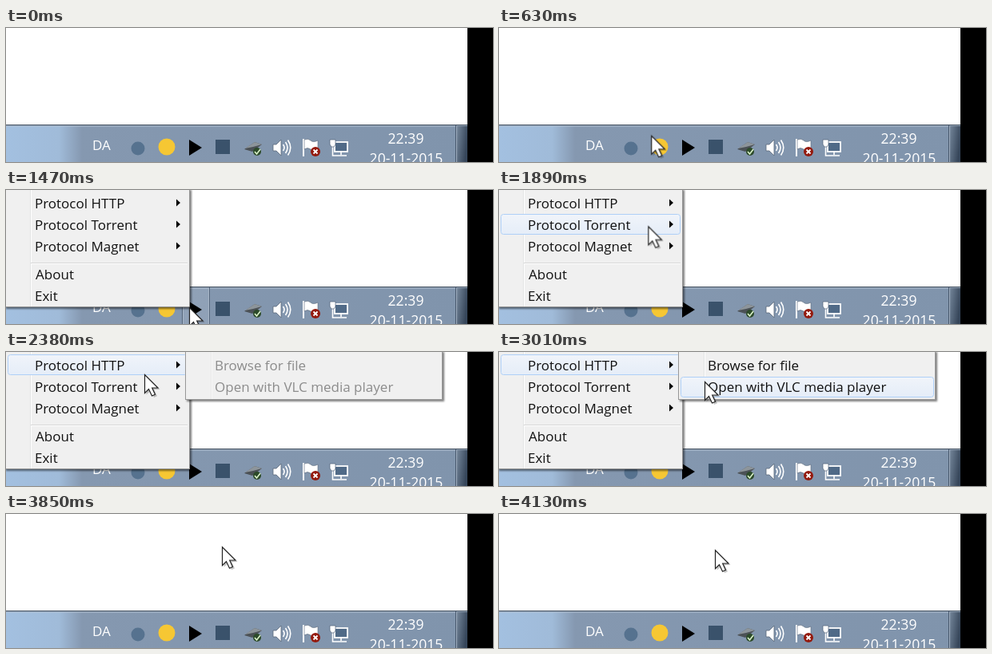
Write an HTML page that moves like this. It is 609x168 px and loops after 4270 ms.

```html
<!DOCTYPE html>
<html lang="en">
<head>
<meta charset="utf-8">
<title>Tray menu</title>
<style>
  html, body { margin: 0; width: 100%; height: 100%; overflow: hidden; background: #fff; }
  svg { display: block; font: 17px "Open Sans", "Noto Sans", sans-serif; }

  /* 61 ticks of 70 ms */
  .menu, .sub, .label, .hover, .pick, .subpick, .cursor { animation: 4270ms step-end infinite; }
  .menu { animation-name: menu; }
  .sub { animation-name: sub; }
  .label { animation-name: label; }
  .hover { animation-name: hover; }
  .pick { animation-name: pick; }
  .subpick { animation-name: subpick; }
  .cursor { animation-name: cursor; }

  .panel { fill: #f0f0f0; stroke: #979797; }
  .menu, .sub { filter: drop-shadow(2px 2px 1.2px rgba(0, 0, 0, .5)); }
  .menu text, .sub text { fill: #111; }
  .bar { fill: #fff; }
  .line { fill: none; stroke: #fff; stroke-width: 1.6; }

  @keyframes menu {
    0% { opacity: 0; }
    32.786% { opacity: .5; }
    34.426% { opacity: 1; }
    86.885% { opacity: .66; }
    88.524% { opacity: .3; }
    90.163%, 100% { opacity: 0; }
  }
  @keyframes sub {
    0% { opacity: 0; }
    55.737% { opacity: 1; }
    86.885% { opacity: .66; }
    88.524% { opacity: .3; }
    90.163%, 100% { opacity: 0; }
  }
  @keyframes label {
    0% { opacity: .45; }
    57.377%, 100% { opacity: 1; }
  }
  @keyframes hover {
    0% { opacity: 0; }
    19.672% { opacity: 1; }
    39.344%, 100% { opacity: 0; }
  }
  @keyframes pick {
    0% { opacity: 0; transform: translateY(116px); }
    37.704% { opacity: 1; transform: translateY(116px); }
    39.344% { opacity: 1; transform: translateY(89px); }
    40.983% { opacity: 1; transform: translateY(54px); }
    44.262% { opacity: 1; transform: translateY(27px); }
    45.901%, 100% { opacity: 1; transform: none; }
  }
  @keyframes subpick {
    0% { opacity: 0; transform: none; }
    63.934% { opacity: 1; transform: none; }
    67.213%, 100% { opacity: 1; transform: translateY(27px); }
  }
  @keyframes cursor {
    0% { transform: translate(-60px, 0); }
    8.196% { transform: translate(137px, 156px); animation-timing-function: steps(3, end); }
    13.114% { transform: translate(180px, 130px); animation-timing-function: steps(4, end); }
    19.672% { transform: translate(221px, 149px); animation-timing-function: steps(3, end); }
    24.590% { transform: translate(229px, 147px); }
    36.065% { transform: translate(229px, 147px); animation-timing-function: steps(3, end); }
    40.983% { transform: translate(213px, 80px); animation-timing-function: steps(3, end); }
    45.901% { transform: translate(173px, 28px); }
    55.737% { transform: translate(173px, 28px); animation-timing-function: steps(4, end); }
    62.295% { transform: translate(222px, 20px); animation-timing-function: steps(3, end); }
    67.213% { transform: translate(255px, 35px); }
    70.491% { transform: translate(257px, 37px); animation-timing-function: steps(6, end); }
    80.327% { transform: translate(270px, 38px); }
    85.245% { transform: translate(270px, 38px); animation-timing-function: steps(7, end); }
    96.721%, 100% { transform: translate(270px, 45px); }
  }
</style>
</head>
<body>
<svg width="609" height="168" viewBox="0 0 609 168">
  <defs>
    <linearGradient id="glass">
      <stop offset="0" stop-color="#a3c0e0"/>
      <stop offset=".115" stop-color="#a0bbd9"/>
      <stop offset=".165" stop-color="#8598b0"/>
      <stop offset="1" stop-color="#8094ac"/>
    </linearGradient>
    <linearGradient id="edge" x2="1" y2=".4">
      <stop offset="0" stop-color="#77899d"/>
      <stop offset="1" stop-color="#36465a"/>
    </linearGradient>
    <linearGradient id="glow" x2="0" y2="1">
      <stop offset="0" stop-color="#f0f4fa"/>
      <stop offset="1" stop-color="#e5edf8"/>
    </linearGradient>
    <path id="arrow" d="M0-4.5 5 0 0 4.5z"/>
  </defs>

  <rect width="609" height="168" fill="#fff"/>

  <g id="taskbar">
    <rect y="122" width="577" height="46" fill="url(#glass)"/>
    <rect y="121" width="577" height="1.5" fill="#4a5767"/>
    <rect y="122.5" width="577" height="1" fill="#b4c4d6"/>
    <rect x="563" y="123" width="14" height="45" fill="url(#edge)"/>
    <rect x="562" y="122" width="1" height="46" fill="#46566a"/>
    <rect x="563" y="123" width="1" height="45" fill="#a3b2c4"/>
    <g class="hover">
      <rect x="221" y="123" width="33" height="45" fill="#fff" opacity=".1"/>
      <path d="M220.5 122v46M254.5 122v46" stroke="#53647a"/>
      <path d="M221.5 123v45M253.5 123v45" stroke="#a9b7c8"/>
    </g>

    <g fill="#fff">
      <text x="108" y="153">DA</text>
      <g font-size="17.6" text-anchor="middle">
        <text x="500" y="145">22:39</text>
        <text x="500.5" y="170">20-11-2015</text>
      </g>
    </g>

    <circle cx="165" cy="151" r="8.5" fill="#56728f"/>
    <circle cx="201" cy="149" r="10.5" fill="#f6c733"/>
    <path d="M229 140v20l16-10z"/>
    <rect x="262" y="140" width="18" height="18" fill="#3a526b"/>

    <g id="device">
      <path d="M298 152l13-9 9 3-12 9z" fill="#4b5156"/>
      <path d="M299 151l12-8 9 3-11 3z" fill="#8d959b"/>
      <circle cx="314" cy="155" r="5" fill="#2c4a2a"/>
      <path d="M311 155l2.5 3 4.5-6" fill="none" stroke="#d9f2c8" stroke-width="1.6"/>
    </g>

    <g id="speaker">
      <path class="bar" d="M334 146h4l6-6v20l-6-6h-4z" stroke="#5a6879" stroke-width=".8"/>
      <path class="line" d="M346.5 146q3 4 0 8M349.5 143q5 7 0 14M352.5 140.5q6.5 9.500 0 19"/>
    </g>

    <g id="flag">
      <path d="M372 139v22" stroke="#fff" stroke-width="2"/>
      <path class="bar" d="M373 140q5-2 8 1t9 0v12q-5 2-9-1t-8 0z" stroke="#58677a" stroke-width=".6"/>
      <circle cx="387" cy="155" r="6" fill="#941a0e"/>
      <path d="M384.5 152.5l5 5m0-5l-5 5" stroke="#fff" stroke-width="1.8"/>
    </g>

    <g id="network">
      <rect x="411" y="143" width="16" height="12" fill="#506a87" stroke="#fff" stroke-width="1.8"/>
      <path class="line" d="M419 155v4M412 160h14M408.5 149v11h5"/>
      <path class="bar" d="M405 140h7v6l-2 3h-3l-2-3z" stroke="#52647a" stroke-width=".7"/>
    </g>
  </g>

  <rect x="577" width="32" height="168"/>

  <g class="menu">
    <rect class="panel" x="-5.5" y="-9.5" width="235" height="156"/>
    <path d="M30.5 0v146" stroke="#e2e3e3"/>
    <path d="M31.5 0v146" stroke="#fff"/>
    <path d="M31 91.5h196" stroke="#d7d7d7"/>
    <path d="M31 92.5h196" stroke="#fff"/>
    <rect class="pick" x="2.5" y="3.5" width="224" height="25" rx="3" fill="url(#glow)" stroke="#aecff7"/>
    <text x="36" y="23">Protocol HTTP</text>
    <text x="36" y="50">Protocol Torrent</text>
    <text x="36" y="77">Protocol Magnet</text>
    <text x="37" y="112">About</text>
    <text x="36" y="139">Exit</text>
    <use href="#arrow" x="213" y="16"/>
    <use href="#arrow" x="213" y="43"/>
    <use href="#arrow" x="213" y="70"/>
  </g>

  <g class="sub">
    <rect class="panel" x="224.5" y="-1.5" width="321" height="61"/>
    <g class="label">
      <path d="M256.5 0v59" stroke="#e2e3e3"/>
      <path d="M257.5 0v59" stroke="#fff"/>
      <rect class="subpick" x="227.5" y="4.5" width="316" height="25" rx="3" fill="url(#glow)" stroke="#aecff7"/>
      <text x="261" y="23">Browse for file</text>
      <text x="261" y="50">Open with VLC media player</text>
    </g>
  </g>

  <g class="cursor">
    <path d="M0 0v23.5l5.5-5 4 8.5 4-1.800-3.800-8.200h7.300z" transform="translate(2.5 2)" opacity=".22"/>
    <path d="M.5.5v23l5-5 4 8.5 4-1.800-3.800-8.200h7.300z" fill="#fff" stroke="#222" stroke-width="1.2"/>
  </g>
</svg>
</body>
</html>
```
